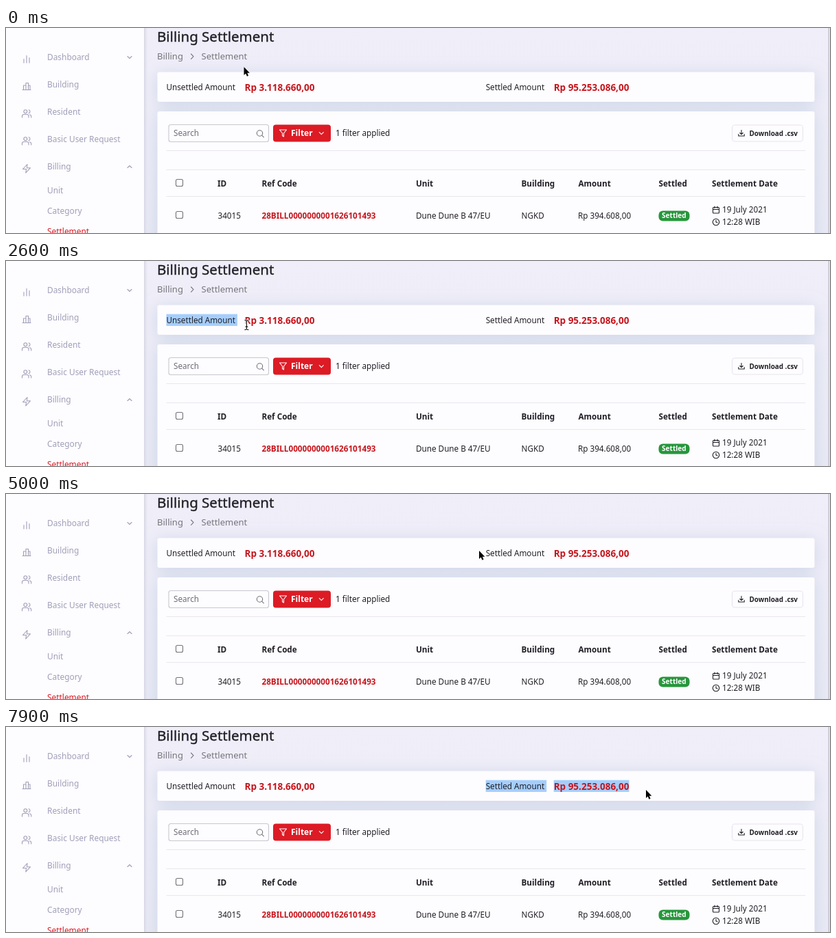
Write an HTML page that moves like this. It is 1200x300 px and loops after 8 s.

```html
<!DOCTYPE html>
<html lang="en">
<head>
<meta charset="utf-8">
<title>Billing Settlement</title>
<style>
html, body { margin: 0; width: 100%; height: 100%; overflow: hidden; background: #efedf8; }
svg { display: block; font: 11.7px "Noto Sans", sans-serif; }
text { fill: #211f26; white-space: pre; }
.nav text { font-size: 11.9px; fill: #a09fb9; }
.crumb text { font-size: 13px; fill: #77757d; }
.bold text { font-weight: 700; }
.semi text, .sum { font-weight: 600; }
.title text { font-size: 20.5px; stroke: #211f26; stroke-width: .35; }
.sum { font-size: 13.5px; }
text.red { fill: #c5161d; }
text.active { fill: #dc1b25; }
text.white { fill: #fff; }
text.hint { fill: #706e76; }
.line { fill: none; stroke-width: 1.1; stroke-linecap: round; stroke-linejoin: round; }
.sel { fill: #a5cefc; }
</style>
</head>
<body>
<svg width="1200" height="300" viewBox="0 0 1200 300">
  <defs>
    <linearGradient id="page" x2="0" y2="1">
      <stop stop-color="#f0eef9"/><stop offset="1" stop-color="#e8e9f4"/>
    </linearGradient>
    <linearGradient id="edge">
      <stop stop-color="#d5d6e3"/><stop offset="1" stop-color="#e4e5f0" stop-opacity="0"/>
    </linearGradient>
    <filter id="shadow" x="-10%" y="-30%" width="120%" height="160%">
      <feDropShadow dx="0" dy="3" stdDeviation="11" flood-color="#b3c4da" flood-opacity=".55"/>
    </filter>
    <path id="stem" d="M-2.5-7q2 0 2.500 1.200Q.5-7 2.500-7M0-5.800V5.800M-2.500 7q2 0 2.500-1.200Q.5 7 2.500 7M-1.500 2.500h3"/>
  </defs>

  <rect width="1200" height="300" fill="url(#page)"/>
  <g fill="#fdfcfe" filter="url(#shadow)">
    <rect x="220.5" y="64.5" width="957" height="43.5" rx="3"/>
    <rect x="220.5" y="122" width="957" height="220" rx="3"/>
  </g>
  <rect x="201" width="6" height="300" fill="url(#edge)"/>
  <rect width="201" height="300" fill="#fdfcfe"/>
  <rect x="1197.5" width="1.5" height="300" fill="#c3c2cd"/>

  <g class="line" stroke="#a09fb9">
    <path d="M26 45.5V51M30 40.5V51M34 43.5V51"/>
    <path d="M24 90.5h12M25.5 90.5V84H29M29 90.5v-10h3.500v10M32.500 84H35v6.500"/>
    <g id="people">
      <path d="M23.500 131v-2q0-2.500 2.500-2.500h4.500q2.500 0 2.500 2.500v2M34.500 126.700q2.200.5 2.200 2.500v1.800M33 119.800q2 .4 2 2.400t-2 2.400"/>
      <circle cx="28.300" cy="122.200" r="2.400"/>
    </g>
    <use href="#people" y="40"/>
    <path d="M31 199.500l-6.500 7h5l-.7 5.500 6.700-7.300h-5.100z"/>
    <path d="M177 41.500l3 3 3-3M177 204.500l3-3 3 3"/>
    <path d="M269.500 38l3.500 3.700-3.500 3.700" stroke="#77757d"/>
  </g>

  <g class="line" stroke-width="1">
    <path d="M234 179.500h930M234 207.500h930M234 246.500h930" stroke="#e9e7ee"/>
    <rect x="237" y="141.500" width="145.500" height="25" rx="3" stroke="#c9c7d1"/>
    <rect x="1057.500" y="142" width="103" height="24" rx="4" stroke="#e8e6ee"/>
    <g stroke="#74727a">
      <circle cx="369.500" cy="154" r="4.200"/><path d="M372.700 157.200l2.600 2.600"/>
      <rect x="247.500" y="221.500" width="10" height="10" rx="2"/>
      <rect x="247.500" y="268.500" width="10" height="10" rx="2"/>
    </g>
    <g stroke="#211f26">
      <path d="M1071 149.500v6M1068.800 153.500l2.200 2.200 2.200-2.200M1066.800 155.500v2.500h8.400v-2.500"/>
      <rect x="1029.500" y="262.500" width="9" height="8.500" rx="1"/>
      <path d="M1029.500 265.500h9M1032 261v2.500M1036 261v2.500"/>
      <circle cx="1034" cy="284" r="4.700"/><path d="M1034 281.200v2.900l2 1"/>
    </g>
  </g>
  <rect x="389" y="141.500" width="84" height="25" rx="4" fill="#dc1b25"/>
  <path class="line" stroke="#fff" d="M398.500 149h10l-4 5v5l-2-1.200V154zM456.300 152.700l3 3 3-3"/>
  <rect x="950.500" y="267.500" width="45" height="15" rx="6" fill="#27963c"/>

  <g id="marks" class="sel"></g>
  <g id="labels"></g>

  <g id="arrow">
    <path transform="scale(.9)" d="M0 0v13.200l3-2.700 2 4.700 2.300-1-2-4.500h4z" stroke="#fff" paint-order="stroke" stroke-linejoin="round"/>
  </g>
  <g id="beam" class="line">
    <use href="#stem" stroke="#fff" stroke-width="2.400"/>
    <use href="#stem" stroke="#111"/>
  </g>
</svg>
<script>
const $ = id => document.getElementById(id);
const NS = 'http://www.w3.org/2000/svg';

function add(parent, tag, attrs, body = '') {
  const el = document.createElementNS(NS, tag);
  for (const key in attrs) el.setAttribute(key, attrs[key]);
  el.textContent = body;
  return parent.appendChild(el);
}
function group(cls, rows) {
  const g = add($('labels'), 'g', { class: cls });
  return rows.map(([x, y, body, kind = '', size]) => {
    const el = add(g, 'text', { x, y, class: kind }, body);
    if (size) el.style.fontSize = size + 'px';
    return el;
  });
}

group('nav', [
  [60, 47, 'Dashboard'], [60, 87, 'Building'], [60, 127, 'Resident'],
  [60, 167, 'Basic User Request'], [60, 207, 'Billing'],
  [60, 242, 'Unit'], [60, 272, 'Category']
]);
group('', [[60, 302, 'Settlement', 'active', 11.9]]);
group('crumb', [[220, 46, 'Billing'], [284.5, 46, 'Settlement']]);
group('title', [[220, 20, 'Billing Settlement']]);
group('', [
  [244, 158.3, 'Search', 'hint'], [480, 158.3, '1 filter applied'],
  [308.5, 278.6, '34015'], [597, 278.6, 'Dune Dune B 47/EU'],
  [750.5, 278.6, 'NGKD'], [833, 278.6, 'Rp 394.608,00'],
  [1043, 270.3, '19 July 2021'], [1043, 287.6, '12:28 WIB']
]);
group('bold', [
  [415, 158.3, 'Filter', 'white', 12],
  [308, 231.5, 'ID'], [372.5, 231.5, 'Ref Code'], [597, 231.5, 'Unit'],
  [750.5, 231.5, 'Building'], [833.5, 231.5, 'Amount'],
  [950.5, 231.5, 'Settled'], [1028, 231.5, 'Settlement Date'],
  [372.5, 278.6, '28BILL0000000001626101493', 'red']
]);
group('semi', [
  [1082.5, 157.6, 'Download .csv', '', 9.9],
  [955, 278.4, 'Settled', 'white', 10.1]
]);
const sums = group('', [
  [233.5, 91, 'Unsettled Amount '], [347.5, 91.5, 'Rp 3.118.660,00', 'sum red'],
  [698.7, 91, 'Settled Amount '], [797.7, 91.5, 'Rp 95.253.086,00', 'sum red']
]);
const marks = sums.map(el => add($('marks'), 'rect', { x: el.getAttribute('x'), y: 77.7, height: 17.3 }));

// Pointer path: time, x, y
const path = [
  [0, 346.5, 57], [900, 250, 65], [1400, 233, 82], [1900, 234, 90],
  [2200, 280, 92], [2700, 368, 94], [3200, 440, 99], [3700, 462, 99],
  [4400, 630, 88], [5000, 689, 83], [5500, 699, 88], [6100, 764, 89],
  [6800, 866, 91], [7400, 922, 92], [7900, 932, 92], [8000, 932, 92]
];
function pointer(t) {
  const i = path.findIndex(p => p[0] > t);
  const [t0, x0, y0] = path[i - 1], [t1, x1, y1] = path[i];
  const k = (t - t0) / (t1 - t0);
  return [x0 + (x1 - x0) * k, y0 + (y1 - y0) * k];
}

// Width of the whole characters left of x
function selected(el, x) {
  const room = x - el.getAttribute('x');
  let width = 0;
  for (let n = 1; n <= el.getNumberOfChars(); n++) {
    const next = el.getSubStringLength(0, n);
    if (next > room) break;
    width = next;
  }
  return width;
}

function draw(now) {
  const t = Math.floor(now % 8000 / 100) * 100;
  const [x, y] = pointer(t);
  const first = t >= 1900 && t < 3900, second = t >= 5500;
  sums.forEach((el, i) => {
    const on = i < 2 ? first : second;
    const reach = i < 2 && t >= 3100 ? 500 : x;
    marks[i].setAttribute('width', on ? selected(el, reach) : 0);
  });
  const beam = t >= 1500 && t < 3000 || t >= 5300 && t < 7300;
  $('arrow').style.display = beam ? 'none' : '';
  $('beam').style.display = beam ? '' : 'none';
  $(beam ? 'beam' : 'arrow').setAttribute('transform', `translate(${x} ${y})`);
  requestAnimationFrame(draw);
}
requestAnimationFrame(draw);
</script>
</body>
</html>
```
